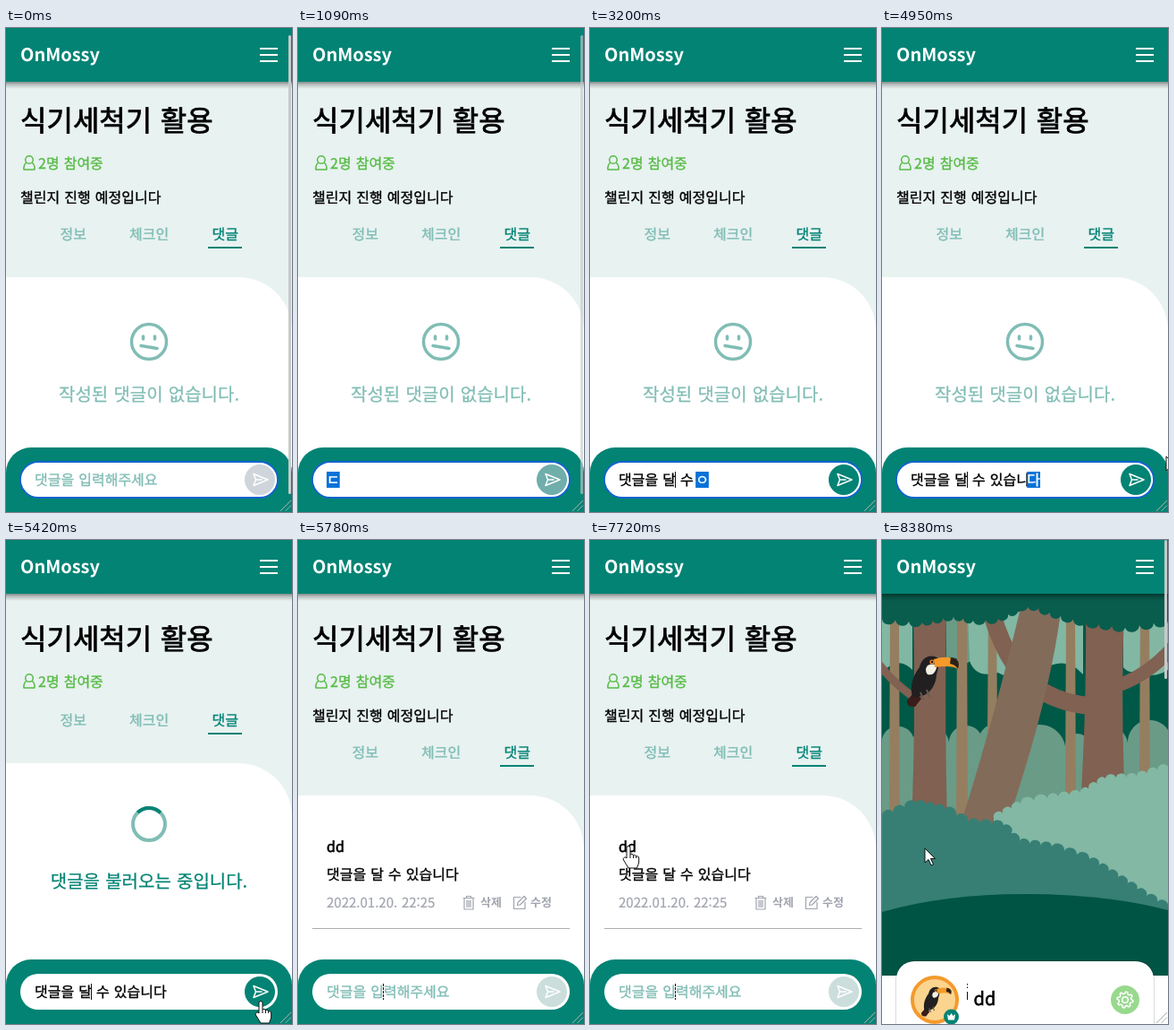
Animation, 320 px wide and 540 px high, one loop 9880 ms. Source, as an HTML page:

```html
<!DOCTYPE html>
<html lang="ko">
<head>
<meta charset="utf-8">
<title>OnMossy</title>
<style>
  html, body { margin: 0; width: 100%; height: 100%; overflow: hidden; background: #fff; }
  svg { display: block; width: 100vw; height: 100vh; }
  text {
    font: 500 16px "Noto Sans CJK KR", "Noto Sans CJK", "Noto Sans KR", sans-serif;
    word-spacing: .6px; white-space: pre; text-rendering: geometricPrecision;
    color: #000; fill: currentColor; stroke: currentColor; stroke-width: .35px;
  }
  .brand { font-size: 20px; font-weight: 700; color: #fff; stroke: none; }
  .title { font-size: 32px; stroke-width: .8px; }
  .big { font-size: 20px; stroke-width: .25px; }
  .user { stroke-width: .6px; }
  .date { font-size: 15px; color: #a0a4ae; stroke-width: .2px; }
  .tool { font-size: 13px; font-weight: 700; color: #a0a4ae; stroke: none; }
  .pale { color: #80bdb5; }
  .teal { color: #028374; fill: #028374; }
  .line { fill: none; stroke-linecap: round; stroke-linejoin: round; }
</style>
</head>
<body>
<svg viewBox="0 0 320 540" preserveAspectRatio="none">
  <defs>
    <linearGradient id="shade" x2="0" y2="1">
      <stop stop-color="#000" stop-opacity=".42"/>
      <stop offset=".4" stop-color="#000" stop-opacity=".2"/>
      <stop offset="1" stop-color="#000" stop-opacity="0"/>
    </linearGradient>
    <g id="toucan">
      <path d="M36 170L28 179Q27 187 37 186L44 177Z" fill="#3a1d19"/>
      <path d="M63 132C53 126 44 132 42 142C34 152 31 164 34 175C47 177 60 168 61 150Q64 142 63 132Z" fill="#211f20"/>
      <path d="M51 140Q60 136 61 143Q58 152 51 150Q47 145 51 140Z" fill="#f4f1e6"/>
      <path d="M43 170L46 178M50 167L53 175" stroke="#665c54" stroke-width="2"/>
      <path d="M58 133Q74 128 84 134Q88 139 85 144Q78 139 59 142Z" fill="#f49a28"/>
      <path d="M77 131Q89 133 85 144Q82 139 76 138Z" fill="#2a211d"/>
      <circle cx="56" cy="136" r="2.6" fill="#e88a31"/>
      <circle cx="56" cy="136" r="1.2" fill="#111"/>
    </g>
  </defs>

  <g id="challenge">
    <rect width="320" height="540" fill="#e8f2f1"/>
    <g id="intro">
      <text class="title" x="16" y="122">식기세척기 활용</text>
      <g class="line" stroke="#57bb45" stroke-width="1.5">
        <circle cx="26" cy="154" r="4.3"/>
        <path d="M22.5 157.5Q19.5 160 20 165H32Q32.5 160 29.5 157.5"/>
      </g>
      <text x="36" y="164" color="#57bb45" style="color:#57bb45">2명 참여중</text>
      <text id="notice" x="16" y="202">챌린지 진행 예정입니다</text>
    </g>
    <g id="sheet">
      <path d="M0 285H260a60 60 0 0 1 60 60V640H0Z" fill="#fff"/>
      <text class="pale" x="60.5" y="243">정보</text>
      <text class="pale" x="138" y="243">체크인</text>
      <text class="teal" x="230.5" y="243">댓글</text>
      <rect class="teal" x="226" y="251" width="38" height="2"/>
      <g id="empty">
        <g class="line" stroke="#80bdb5" stroke-width="3.5">
          <circle cx="160" cy="357" r="19.5"/>
          <path d="M153.5 351v3M166.500 351v3M151 361.5L169 364.5"/>
        </g>
        <text class="big pale" x="160" y="422.5" text-anchor="middle">작성된 댓글이 없습니다.</text>
      </g>
      <g id="loading">
        <g fill="none" stroke-width="4">
          <circle cx="160" cy="353" r="18" stroke="#80bdb5"/>
          <path id="arc" d="M147.27 340.27A18 18 0 0 1 172.73 340.27" stroke="#028374"/>
        </g>
        <text class="big teal" x="160" y="423.5" text-anchor="middle">댓글을 불러오는 중입니다.</text>
      </g>
      <g id="comment">
        <text class="user" x="32" y="348">dd</text>
        <text x="32" y="379">댓글을 달 수 있습니다</text>
        <text class="date" x="32" y="410">2022.01.20. 22:25</text>
        <g class="line" stroke="#a0a4ae" stroke-width="1.2">
          <path d="M185 399.5H197M188.5 399V397.5H193.5V399M186 400V412H196V400M189 402V409.5M191 402V409.5M193 402V409.5"/>
          <path d="M249 398.5H241.5V411.5H254V404M245.5 407.5L246 404.5L253 397.5L255.5 400L248.5 407Z"/>
        </g>
        <text class="tool" x="204" y="409">삭제</text>
        <text class="tool" x="260" y="409">수정</text>
        <path d="M16 433.5H304" stroke="#adadad"/>
      </g>
    </g>
    <path class="teal" d="M0 540V496a28 28 0 0 1 28-28H292a28 28 0 0 1 28 28V540Z"/>
    <rect id="field" x="16" y="484" width="288" height="40" rx="20" fill="#fff" stroke-width="1.8"/>
    <text id="placeholder" class="pale" x="32" y="510">댓글을 입력해주세요</text>
    <text id="typed" x="32" y="510"></text>
    <rect id="mark" y="495" width="14.72" height="18" fill="#0872d8"/>
    <text id="composing" y="510" style="color:#fff"></text>
    <circle id="send" cx="284" cy="504" r="17"/>
    <path class="line" d="M277 497.5L293 504L277 510.5L279.5 504ZM279.5 504H286" stroke="#fff" stroke-width="1.5"/>
  </g>

  <g id="profile">
    <rect y="60" width="320" height="426" fill="#005847"/>
    <g id="forest"></g>
    <use href="#toucan"/>
    <rect y="486" width="320" height="54" fill="#fff"/>
    <rect x="15" y="469" width="290" height="90" rx="21" opacity=".14"/>
    <rect x="16" y="470" width="288" height="90" rx="20" fill="#fff"/>
    <g id="account">
      <circle cx="59" cy="513" r="25" fill="#fbd58f" stroke="#f39a2d" stroke-width="4"/>
      <use href="#toucan" transform="translate(27.8 423.6) scale(.58)"/>
      <circle cx="77.5" cy="532" r="8.5" class="teal"/>
      <path d="M73 529L75.5 531L77.5 528L79.5 531L82 529L81 535.5H74Z" fill="#fff"/>
      <text class="big user" x="102.5" y="518.5">dd</text>
      <circle cx="272" cy="513" r="16" fill="#98d98e"/>
      <g class="line" stroke="#fff" stroke-width="1.5">
        <circle cx="272" cy="513" r="3.3"/>
        <path id="gear"/>
      </g>
    </g>
  </g>

  <path id="caret" d="M0 495V513" stroke="#111"/>
  <path id="trace" d="M95.5 495V513" stroke="#111"/>

  <rect y="60" width="320" height="8" fill="url(#shade)"/>
  <rect class="teal" width="320" height="60"/>
  <text class="brand" x="16" y="36.5">OnMossy</text>
  <path d="M284 23H304M284 30H304M284 37H304" stroke="#fff" stroke-width="2"/>
  <rect id="scroll" x="316" width="3" rx="1.5" fill="#c6cbca"/>
  <path d="M307 539L319 527M312.5 539L319 532.5" stroke="#a5afac"/>
  <g id="cursor" fill="#fff" stroke="#111" stroke-linejoin="round">
    <path id="arrow" d="M0 0V16L4 12.5L7 19L9.5 18L6.5 11.5H11.5Z"/>
    <g id="hand">
      <path d="M-2 1.5a2 2 0 0 1 4 0V9a2 2 0 0 1 3.5 1a2 2 0 0 1 3.2 1a2 2 0 0 1 3 2V18L9.5 24H0L-5.5 15a2 2 0 0 1 3.5-2Z"/>
      <path d="M2 9v4M5.5 10v3M8.7 11v2" fill="none"/>
    </g>
  </g>
</svg>
<script>
const LOOP = 9880;
const $ = id => document.getElementById(id);
const show = (id, on) => { $(id).style.display = on ? '' : 'none'; };
const set = (id, name, value) => $(id).setAttribute(name, value);
const clamp = v => Math.min(1, Math.max(0, v));
const lerp = (a, b, p) => a + (b - a) * p;

// Scenery
function leafy(points, size) {
  let d = `M${points[0]}`;
  for (let i = 1; i < points.length; i++) {
    const [x0, y0] = points[i - 1], [x1, y1] = points[i];
    const dx = x1 - x0, dy = y1 - y0, length = Math.hypot(dx, dy);
    const n = Math.max(1, Math.round(length / size)), r = length / n * .52;
    for (let k = 0; k < n; k++) d += `a${r} ${r} 0 0 1 ${dx / n} ${dy / n}`;
  }
  return d;
}
const shape = (d, fill) => `<path d="${d}" fill="${fill}"/>`;
const stem = (x, top, bottom, w) =>
  shape(`M${x + 1} ${top}h${w - 1}L${x + w + 1} ${bottom}H${x}Z`, '#957e60');
const bough = (d, width) =>
  `<path d="${d}" fill="none" stroke="#806152" stroke-width="${width}"/>`;

$('forest').innerHTML = [
  shape('M0 80H34V145Q18 128 0 148Z', '#82b7a3'),
  shape('M72 85H112Q114 130 94 138Q78 128 72 132Z', '#6a9b87'),
  shape('M96 80H225V150Q205 128 180 145Q150 160 130 148Q105 155 98 135Z', '#82b7a3'),
  shape('M270 85H320V145Q302 156 288 146Q276 150 270 142Z', '#82b7a3'),
  shape(leafy([[0, 222], [35, 220], [75, 226], [110, 216], [150, 224], [205, 230], [230, 222], [275, 226], [320, 212]], 38) + 'V330H0Z', '#6a9b87'),
  stem(8, 80, 312, 11), stem(83, 80, 315, 12), stem(118, 80, 214, 10),
  stem(205, 80, 285, 11), stem(288, 80, 270, 11),
  bough('M-4 138Q14 162 40 178', 9),
  bough('M124 86Q142 145 178 168Q208 186 250 186', 20),
  bough('M262 163Q298 151 326 119', 15),
  shape('M35 84H72Q70 200 73 315H33Q38 200 35 84Z', '#806152'),
  shape('M156 72L200 80Q187 180 139 320H87Q124 205 156 72Z', '#836b5a'),
  shape('M228 76H271Q267 185 272 295H222Q229 190 228 76Z', '#806152'),
  shape(leafy([[320, 90], [272, 98], [228, 92], [200, 85], [163, 72], [130, 88], [102, 90], [80, 85], [45, 92], [0, 88]], 14) + 'V60H320Z', '#085d4d'),
  shape(leafy([[125, 310], [155, 294], [185, 288], [222, 283], [250, 266], [285, 264], [320, 253]], 13) + 'V430H125Z', '#82b8a4'),
  shape(leafy([[0, 309], [38, 293], [70, 300], [96, 315], [136, 318], [153, 337], [190, 342], [232, 356], [264, 376], [296, 397], [320, 410]], 13) + 'V430H0Z', '#377f74'),
  shape('M0 415Q70 395 160 395Q250 395 320 413V486H0Z', '#005444')
].join('');

let teeth = '';
for (let i = 0; i < 32; i++) {
  const angle = (i + .5) / 32 * Math.PI * 2, r = i % 4 < 2 ? 9 : 6.8;
  teeth += `${i ? 'L' : 'M'}${272 + r * Math.cos(angle)} ${513 + r * Math.sin(angle)}`;
}
set('gear', 'd', teeth + 'Z');

// Start time, committed text, syllable being composed
const typing = [
  [0, '', ''], [950, '', 'ㄷ'], [1110, '', '대'], [1250, '', '댓'],
  [1380, '댓', 'ㄱ'], [1540, '댓', '그'], [1600, '댓', '글'],
  [1740, '댓글', 'ㅇ'], [1860, '댓글', '으'], [1980, '댓글', '을'], [2140, '댓글을 ', ''],
  [2450, '댓글을 ', 'ㄷ'], [2560, '댓글을 ', '다'], [2660, '댓글을 ', '달'], [2770, '댓글을 달', ''],
  [2910, '댓글을 달 ', 'ㅅ'], [2980, '댓글을 달 ', '수'], [3050, '댓글을 달 수 ', ''],
  [3200, '댓글을 달 수 ', 'ㅇ'], [3260, '댓글을 달 수 ', '이'], [3430, '댓글을 달 수 ', '있'],
  [3520, '댓글을 달 수 있', 'ㅅ'], [3610, '댓글을 달 수 있', '스'], [3700, '댓글을 달 수 있', '습'],
  [3870, '댓글을 달 수 있습', 'ㄴ'], [3940, '댓글을 달 수 있습', '니'],
  [4150, '댓글을 달 수 있습니', '다'], [5330, '댓글을 달 수 있습니다', ''], [5630, '', '']
];
// Start time, content, intro offset, sheet offset
const views = [[0, 'empty', -7, -7], [5330, 'loading', 0, -36], [5630, 'comment', 0, 0]];
// Start, end, from, to
const moves = [
  [4950, 5130, [318, 478], [285, 515]],
  [6810, 7500, [307, 381], [43, 342]],
  [8380, 8381, [48, 344], [48, 344]]
];
const at = (table, t) => table.findLast(row => row[0] <= t);
const textEnd = s => 32 + [...s].reduce((w, c) => w + (c === ' ' ? 4.18 : 14.72), 0);

function drawInput(t) {
  const [, done, syllable] = at(typing, t);
  const x = textEnd(done);
  $('typed').textContent = done;
  $('composing').textContent = syllable;
  set('composing', 'x', x);
  set('mark', 'x', x);
  show('mark', syllable);
  show('placeholder', !done && !syllable);
  show('caret', done && !syllable && t < 5330);
  set('caret', 'transform', `translate(${Math.round(x) + .5})`);
  show('trace', t >= 2770);
  set('trace', 'stroke-dasharray', t < 5630 ? 'none' : t < 8180 ? '3 1' : '1.5 2 1.5 4 9');
  set('field', 'stroke', t < 5330 ? '#1262d2' : 'none');
  const p = clamp((t - 950) / 300);
  const live = [207, 213, 218].map((v, i) => Math.round(lerp(v, [2, 131, 116][i], p)));
  set('send', 'fill', t < 5630 ? `rgb(${live})` : '#cbdedc');
}

function drawCursor(t) {
  const visible = t >= 4950 && t < 5780 || t >= 6810;
  show('cursor', visible);
  if (!visible) return;
  const [start, end, from, to] = at(moves, t);
  const p = clamp((t - start) / (end - start)), e = p * p * (3 - 2 * p);
  set('cursor', 'transform', `translate(${from.map((v, i) => lerp(v, to[i], e))})`);
  const hand = t >= 5070 && t < 5780 || t >= 7690 && t < 8380;
  show('hand', hand);
  show('arrow', !hand);
}

function draw(t) {
  const profile = t >= 8180;
  show('challenge', !profile);
  show('profile', profile);
  show('account', t >= 8230);
  const [, content, introY, sheetY] = at(views, t);
  views.forEach(([, id]) => show(id, id === content));
  show('notice', content !== 'loading');
  set('intro', 'transform', `translate(0 ${introY})`);
  set('sheet', 'transform', `translate(0 ${sheetY})`);
  set('arc', 'transform', `rotate(${(t - 5420) * .36} 160 353)`);
  set('scroll', 'y', profile ? 0 : 8);
  set('scroll', 'height', profile ? 155 : 512);
  set('scroll', 'opacity', profile ? 1 : 1 - clamp((t - 950) / 400));
  drawInput(t);
  drawCursor(t);
}

const begin = performance.now();
function tick() {
  draw((performance.now() - begin) % LOOP);
  requestAnimationFrame(tick);
}
tick();
</script>
</body>
</html>
```
